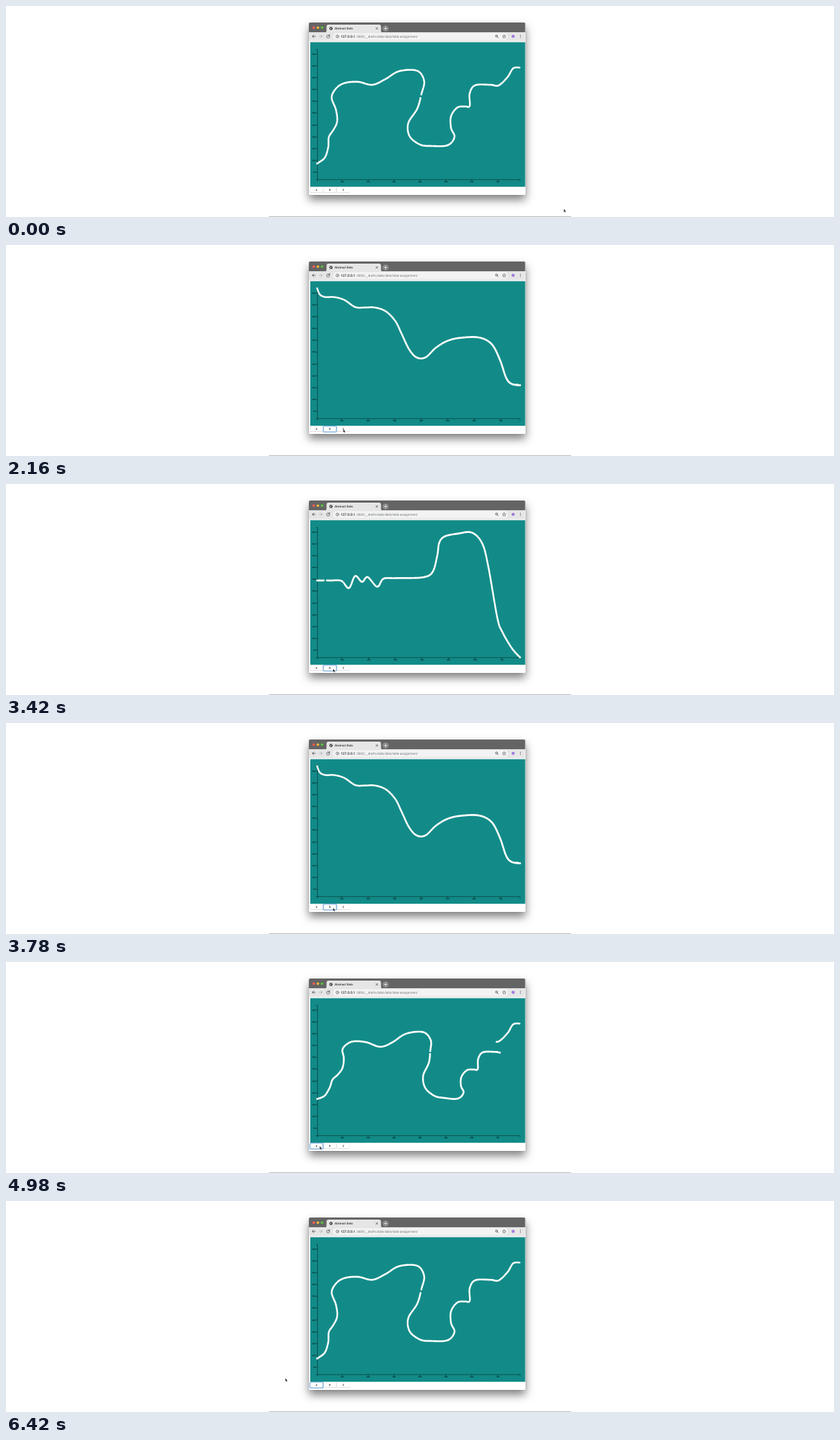
These frames come from a looping animation (1200x306 px, 6480 ms). An HTML page:

```html
<!DOCTYPE html>
<html lang="en">
<head>
<meta charset="utf-8">
<title>Abstract Data</title>
<style>
  html, body { margin: 0; width: 100%; height: 100%; overflow: hidden; background: #fff; }
  svg { position: absolute; left: 0; top: 0; display: block; }
  #window {
    position: absolute; left: 439px; top: 24px; width: 313.5px; height: 249.5px;
    border-radius: 2px 2px 1px 1px; background: #fff;
    box-shadow: 0 0 1px rgba(0,0,0,.45), 0 7px 13px rgba(0,0,0,.5);
  }
  text { font-family: Roboto, Arial, sans-serif; text-rendering: geometricPrecision; }
  .axis { stroke: #000; stroke-width: .45; fill: none; }
  .labels text { font: 3px "Liberation Sans", Arial, sans-serif; }
  .icon { fill: none; stroke: #3f4246; stroke-width: .75; stroke-linecap: round; stroke-linejoin: round; }
  .thin { stroke-width: .55; }
</style>
</head>
<body>
<div id="window"></div>
<svg width="1200" height="306" viewBox="0 0 1200 306">
  <path d="M381 305.5H819" stroke="#b9b9b9"/>

  <!-- tab strip -->
  <path d="M439 38.3V26q0-2 2-2h309.5q2 0 2 2v12.3z" fill="#646464"/>
  <circle cx="446" cy="31.3" r="1.9" fill="#fb5a55"/>
  <circle cx="452" cy="31.3" r="1.9" fill="#e9bd3b"/>
  <circle cx="458" cy="31.3" r="1.9" fill="#55c33c"/>
  <path d="M462.500 38.500q2-.3 2-2.500V30q0-3 3-3h73q3 0 3 3v6q0 2.200 2 2.500z" fill="#e6e6e6"/>
  <circle cx="471" cy="32.6" r="2.4" fill="#3c3f43"/>
  <path d="M469.600 31.600l1.500.6.3 1-1 .9zM471.600 30.800l1.200.9-.9.4z" fill="#e6e6e6"/>
  <text x="476.3" y="34.2" font-size="4.3" font-weight="500" fill="#2a2c30">Abstract Data</text>
  <path class="icon" d="M536.200 31.300l2.600 2.600m0-2.600l-2.600 2.600"/>
  <circle cx="550.2" cy="32.6" r="3.8" fill="#808080" stroke="#acacac" stroke-width=".7"/>
  <path d="M548 32.600h4.400m-2.200-2.200v4.400" stroke="#fff" stroke-width=".8"/>

  <!-- toolbar -->
  <rect x="439" y="38.3" width="313.5" height="14" fill="#e6e6e6"/>
  <rect x="474" y="39.3" width="253.5" height="10" rx="5" fill="#f3f3f3"/>
  <path d="M439 51.500H752.500" stroke="#f4f4f4" stroke-width="1.4"/>
  <path class="icon" d="M448.400 44h-4.400m2-2l-2 2 2 2"/>
  <path class="icon" style="stroke:#aaa" d="M454 44h4.400m-2-2l2 2-2 2"/>
  <path class="icon" d="M468.600 42.800a2.200 2.200 0 1 0 .5 1.600M469 41.500v1.700h-1.700"/>
  <circle class="icon thin" cx="480.3" cy="44.2" r="2.1"/>
  <path class="icon thin" d="M480.300 43.900v1.300m0-2.200v.1"/>
  <text x="485.2" y="46" font-size="4.95" font-weight="500" fill="#222">127.0.0.1</text>
  <text x="507" y="46" font-size="4.67" fill="#6f7276">:3000/__drafts/lab6/lab6/lab6-assignment/</text>
  <circle class="icon" cx="710.9" cy="43.5" r="1.5"/>
  <path class="icon" d="M712 44.700l1.500 1.500"/>
  <path class="icon thin" d="M722 41.700l.75 1.600 1.750.2-1.300 1.200.35 1.750-1.550-.9-1.550.9.35-1.750-1.300-1.200 1.750-.2z"/>
  <circle cx="735" cy="44" r="2.3" fill="#a37de0"/>
  <path class="icon" style="stroke-width:1" d="M745.500 42.200v.01m0 1.800v.01m0 1.800v.01"/>

  <!-- chart -->
  <rect x="441" y="52.5" width="311.5" height="209.7" fill="#128b88"/>
  <g id="yAxis"></g>
  <g id="xAxis"></g>
  <path id="dots" fill="none" stroke="#fff" stroke-width="2.8" stroke-linecap="round"/>
  <g id="buttons"></g>
  <rect id="ring" y="262.8" width="19.1" height="8.4" rx="1" fill="none" stroke="#6ea6e0" stroke-width="1.1"/>
  <path id="cursor" d="M0 0V4.700L1.100 3.700 1.900 5.500 2.800 5.100 2 3.400H3.400z" fill="#111" stroke="#fff" stroke-width=".35"/>
</svg>
<script>
const LOOP = 6480, STEP = 60, MORPH = 250, RELEASE = 115, COUNT = 320;
const NS = 'http://www.w3.org/2000/svg';
const $ = id => document.getElementById(id);

function add(parent, tag, attrs, text) {
  const el = document.createElementNS(NS, tag);
  for (const k in attrs) el.setAttribute(k, attrs[k]);
  if (text !== undefined) el.textContent = text;
  parent.append(el);
  return el;
}

// Each line: key points, a skipped dot, x of the "100" tick, tick distance, dot spread.
// Line B is sampled more coarsely at its start than at its end.
const even = u => u;
const specs = {
  A: {
    keys: '451,228.5 462,220 467,205 468,190 475,179 480,167 478,150 472,133 478,120 490,112 510,110 531,114.3 ' +
      '550,106 570,94.5 596,94 606,109 602,128 596,149 583,170 585,189 600,201 616,203 640,202 650,190 645,177 ' +
      '645,160 654,147.3 665,145.7 672,145 672,127 680,115 702,114.3 714,115.2 727,103 735,90.5 745,89.3',
    gap: [601.2, 130.5], tick0: 487.3, tick: 37.55, spread: even, shared: 709.5
  },
  B: {
    keys: '451,63 455,72 463,75.5 475,75.5 490,79.5 506,90 520,90.7 534,90.6 550,96 564,110 573,128 584,151 ' +
      '595,163 608,163 623,149 640,139 660,134.5 686,134.3 704,144 716,167 725,193 733,201.5 745,203.5',
    tick0: 486.5, tick: 38.4, spread: u => 1 - (1 - u) ** 1.75
  },
  C: {
    keys: '451,140 470,140 486,140.5 497,151 506,133.5 516,142 524,135 538,149 547,137.5 565,136.5 603,135.5 ' +
      '618,128 625,104 628,85 636,76 655,72 675,70.5 690,86 699,120 712,194 719,214 733,238 745,251.5',
    gap: [462.5, 140], tick0: 487, tick: 38.6, spread: even
  }
};

// Smooth path through the key points
function smooth(keys) {
  const p = keys.split(' ').map(s => s.split(',').map(Number));
  const at = i => p[Math.max(0, Math.min(p.length - 1, i))];
  let d = 'M' + p[0];
  for (let i = 0; i < p.length - 1; i++) {
    const [a, b, c, e] = [at(i - 1), at(i), at(i + 1), at(i + 2)];
    const h1 = b.map((v, k) => v + (c[k] - a[k]) / 6);
    const h2 = c.map((v, k) => v - (e[k] - b[k]) / 6);
    d += `C${h1} ${h2} ${c}`;
  }
  const path = document.createElementNS(NS, 'path');
  path.setAttribute('d', d);
  return path;
}

// Dots along a line; those past `shared` have no partner on the other lines
function sample({ keys, gap, spread, shared }) {
  const path = smooth(keys), total = path.getTotalLength();
  let main = total;
  if (shared) while (path.getPointAtLength(main).x > shared) main -= .5;
  const count = Math.round((COUNT - 1) * total / main) + 1;
  return Array.from({ length: count }, (_, i) => {
    const { x, y } = path.getPointAtLength(spread(i / (COUNT - 1)) * main);
    return { x, y, hidden: gap && Math.hypot(x - gap[0], y - gap[1]) < 1.6 };
  });
}

const lines = {};
for (const name in specs) lines[name] = sample(specs[name]);

const presses = [
  { at: 1370, from: 'A', to: 'B' }, { at: 2375, from: 'B', to: 'C' },
  { at: 3420, from: 'C', to: 'B' }, { at: 4704, from: 'B', to: 'A' }
];
const moves = [
  { start: 0, end: 180, x: 713, y: 285.5 }, { start: 360, end: 540, x: 558, y: 275.5 },
  { start: 720, end: 1320, x: 474, y: 268 }, { start: 1920, end: 2160, x: 488.7, y: 267 },
  { start: 3060, end: 3360, x: 474, y: 268 }, { start: 3960, end: 4620, x: 454.6, y: 267 },
  { start: 6000, end: 6420, x: 404.8, y: 257 }
];

const yAxis = $('yAxis'), yLabels = add(yAxis, 'g', { class: 'labels', 'text-anchor': 'end' });
add(yAxis, 'path', { class: 'axis', d: 'M449.2 63H451.4V251.8H449.2' });
for (let i = 0; i < 11; i++) {
  const y = 241.2 - i * 17.15;
  add(yAxis, 'path', { class: 'axis', d: `M449.2 ${y}h2.2` });
  add(yLabels, 'text', { x: 448.8, y: y + 1 }, 50 * (i + 1));
}
const xAxis = $('xAxis'), xLabels = add(xAxis, 'g', { class: 'labels', 'text-anchor': 'middle' });
add(xAxis, 'path', { class: 'axis', d: 'M451.4 254V251.8H745V254' });
const ticks = Array.from({ length: 7 }, (_, i) => [
  add(xAxis, 'path', { class: 'axis', d: 'M0 251.8v2.2' }),
  add(xLabels, 'text', { y: 256.4 }, 100 * (i + 1))
]);

const buttonX = name => 440.7 + 19.5 * 'ABC'.indexOf(name);
for (const name of 'ABC') {
  const x = buttonX(name), box = { x, width: 18.3, height: 7.4, rx: 1 };
  add($('buttons'), 'rect', { ...box, y: 263.5, fill: '#c4c4c4' });
  add($('buttons'), 'rect', { ...box, y: 263, fill: '#fff', stroke: '#dedede', 'stroke-width': .4 });
  add($('buttons'), 'text', {
    x: x + 9.3, y: 268.2, 'font-size': 3.6, 'font-weight': 500, 'text-anchor': 'middle', fill: '#111'
  }, name);
}

const clamp = u => Math.max(0, Math.min(1, u));
const mix = (a, b, u) => a + (b - a) * u;
const ease = u => u < .5 ? 4 * u ** 3 : 1 - (2 - 2 * u) ** 3 / 2;
const latest = (t, delay) => presses.filter(p => p.at + delay <= t).pop();
let drawn = '';

function drawChart(from, to, u) {
  const key = from + to + u;
  if (key === drawn) return;
  drawn = key;
  $('dots').setAttribute('d', lines[to].map((b, i) => {
    const a = lines[from][i] || b;
    return b.hidden ? '' : `M${mix(a.x, b.x, u).toFixed(2)} ${mix(a.y, b.y, u).toFixed(2)}h0`;
  }).join(''));
  ticks.forEach(([mark, label], i) => {
    const x = specs[to].tick0 + i * specs[to].tick;
    mark.setAttribute('transform', `translate(${x} 0)`);
    label.setAttribute('x', x);
  });
}

function cursorAt(t) {
  let x = 808.4, y = 294.3;
  for (const m of moves) {
    const u = clamp((t - m.start) / (m.end - m.start));
    x = mix(x, m.x, u);
    y = mix(y, m.y, u);
  }
  return [x, y];
}

function render(time) {
  const t = Math.floor(time % LOOP / STEP) * STEP;
  const change = latest(t, RELEASE), focus = latest(t, 0);
  if (change) drawChart(change.from, change.to, ease(clamp((t - change.at - RELEASE) / MORPH)));
  else drawChart('A', 'A', 1);

  $('ring').setAttribute('visibility', focus ? 'visible' : 'hidden');
  if (focus) $('ring').setAttribute('x', buttonX(focus.to) - .3);
  $('cursor').setAttribute('transform', `translate(${cursorAt(t)})`);
}

const start = performance.now();
function tick() {
  render(performance.now() - start);
  requestAnimationFrame(tick);
}
tick();
</script>
</body>
</html>
```
